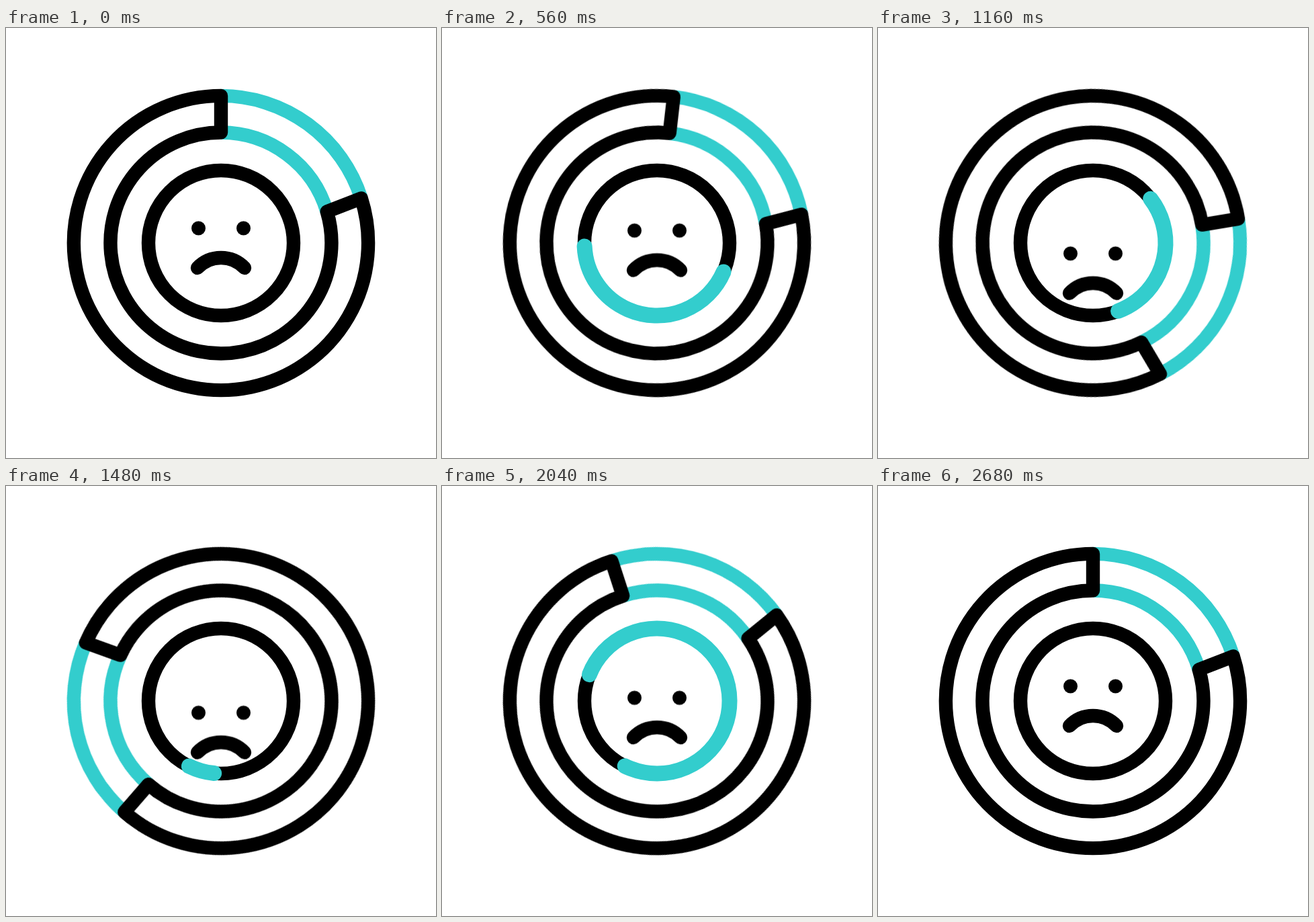
Animation of 640x640 px, one loop 3000 ms. Source, as an HTML page without scripts:

```html
<!DOCTYPE html>
<html lang="en">
<head>
<meta charset="utf-8">
<title>Sad ring</title>
<style>
  @property --base { syntax: "<number>"; inherits: true; initial-value: 90; }
  @property --head { syntax: "<number>"; inherits: true; initial-value: 0; }
  @property --tail { syntax: "<number>"; inherits: true; initial-value: 0; }

  :root { --ease: cubic-bezier(.715, 0, .285, 1); --sweep: cubic-bezier(.45, 0, .53, 1); }
  html, body { margin: 0; width: 100%; height: 100%; overflow: hidden; background: #fff; }
  svg { display: block; width: 100%; height: 100%; }

  .line { fill: none; stroke: #000; stroke-width: 20.4; stroke-linecap: round; stroke-linejoin: round; }
  .accent { fill: none; stroke: #33cdcd; stroke-width: 20.4; }

  /* Each easing applies to every stretch between two keyframes. */
  .gauge { animation: turn 3s var(--ease) infinite; }
  .face { animation: nod 3s var(--ease) infinite; }

  /* The arc runs from tail to head, measured in degrees from a drifting base. */
  .arc {
    stroke-width: 23;
    stroke-linecap: round;
    stroke-dasharray: calc((var(--head) - var(--tail)) * 1px) 999px;
    transform: rotate(calc((var(--base) + var(--tail) - 90) * 1deg));
    animation: base 3s linear infinite, head 3s var(--sweep) infinite,
      tail 3s var(--ease) infinite, show 3s steps(1, end) infinite;
  }

  @keyframes turn {
    0%, 6.667% { transform: rotate(0deg); }
    86.667%, 100% { transform: rotate(360deg); }
  }
  @keyframes nod {
    0%, 6.667%, 86.667%, 100% { transform: translateY(0); }
    48% { transform: translateY(39.5px); }
  }
  @keyframes base {
    0%, 6.667% { --base: 90; }
    18.667% { --base: 99; }
    28% { --base: 113; }
    38.667% { --base: 159.5; }
    49.333% { --base: 206; }
    68% { --base: 281.4; }
    89.333%, 100% { --base: 345; }
  }
  @keyframes head {
    0%, 6.667% { --head: 0; }
    32%, 51.13% { --head: 360; }
    76.47%, 100% { --head: 720; }
  }
  @keyframes tail {
    0%, 6.667% { --tail: 0; }
    63.333% { --tail: 360; }
    89.333%, 100% { --tail: 720; }
  }
  @keyframes show {
    0% { visibility: hidden; }
    7% { visibility: visible; }
    89.3%, 100% { visibility: hidden; }
  }
</style>
</head>
<body>
<svg viewBox="-320 -320 640 640">
  <g class="gauge">
    <path class="accent" d="M0-219.1A219.1 219.1 0 0 1 208.7-66.6M0-164.5A164.5 164.5 0 0 1 157.7-46.7"/>
    <path class="line" d="M0-164.5V-219.1A219.1 219.1 0 1 0 208.7-66.6L157.7-46.7A164.5 164.5 0 1 1 0-164.5Z"/>
  </g>
  <circle class="line" r="108"/>
  <circle class="accent arc" r="108" pathLength="360"/>
  <g class="face">
    <circle cx="-33.5" cy="-22" r="10.5"/>
    <circle cx="33.5" cy="-22" r="10.5"/>
    <path class="line" d="M-35 37A48.3 48.3 0 0 1 35 37"/>
  </g>
</svg>
</body>
</html>
```
